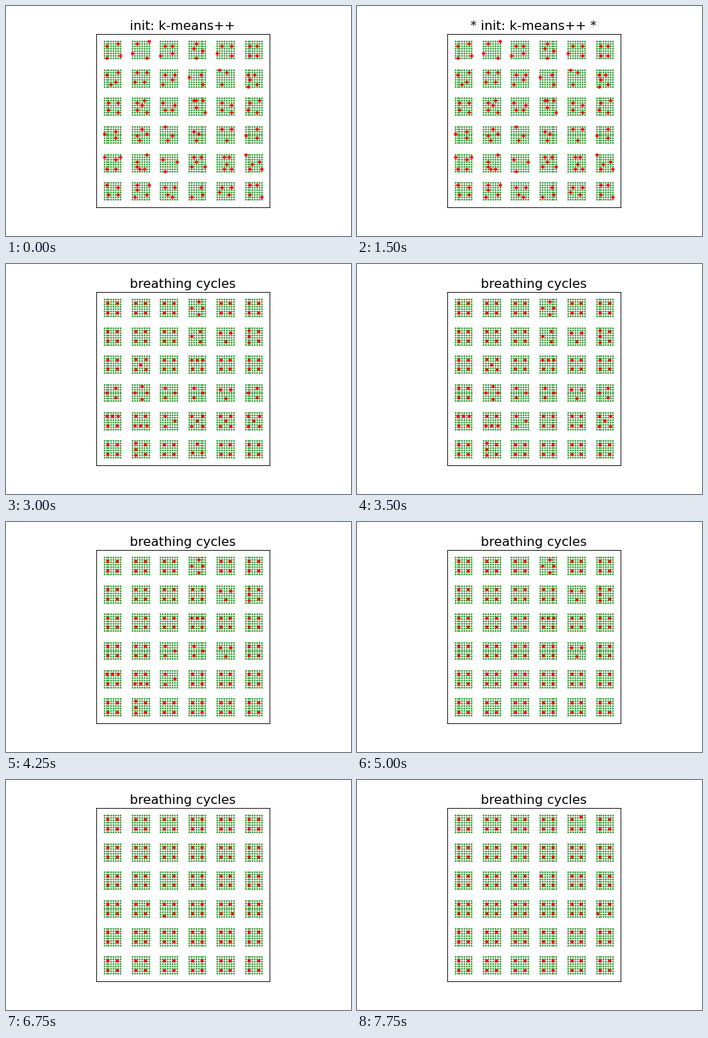
Recreate the animation shown at these times as a matplotlib script. Size 432x288 px, loop 8000 ms.

```python
import numpy as np
import matplotlib.pyplot as plt
from matplotlib.animation import FuncAnimation

SIDE = 8         # data points along one patch edge
PITCH = 12       # distance between neighbouring patches
PATCHES = 6
STEP_MS = 250
INIT_FRAMES = 12
FRAMES = 32
JIGGLE_FROM = 11

W, S, E, N = range(4)   # quarter turns of a layout

# Columns of centres in a patch, from its leading side on.
EVEN, LONE, TRIPLE, MIDDLE, SKEWED = (2, 2), (1, 2), (3, 2), (2, 1, 2), (1, 3)

# Patches repaired in each breathing cycle: (row, column, layout, turn).
REPAIRS = [
    [(3, 0, LONE, W), (4, 4, MIDDLE, W)],
    [(5, 3, LONE, N), (4, 3, MIDDLE, W)],
    [(3, 5, LONE, W), (4, 5, MIDDLE, W)],
    [(1, 3, LONE, W), (2, 1, MIDDLE, W)],
    [(3, 1, SKEWED, W)],
    [(4, 2, LONE, E), (4, 1, TRIPLE, S)],
    [(3, 2, LONE, E), (4, 0, TRIPLE, N)],
    [(3, 3, LONE, E), (5, 1, TRIPLE, W)],
    [(1, 4, LONE, S), (2, 3, TRIPLE, N), (0, 3, SKEWED, W)],
    [(3, 4, LONE, S), (1, 5, TRIPLE, W)],
]

# Positions are complex numbers, y up, measured from the patch centre.
axis = np.arange(SIDE) - (SIDE - 1) / 2
grid = (axis + 1j * axis[:, None]).ravel()


def layout(counts, turn):
    n = len(counts)
    z = [(i + 0.5) / n - 0.5 + 1j * ((j + 0.5) / m - 0.5)
         for i, m in enumerate(counts) for j in range(m)]
    return SIDE * np.array(z) * 1j ** turn


def settle(centres):
    """Lloyd iterations on one patch."""
    for _ in range(20):
        nearest = abs(grid[:, None] - centres).argmin(axis=1)
        centres = np.array([grid[nearest == k].mean()
                            for k in range(len(centres))])
    return centres


def scatter_seeds(centres, rng):
    """Random data points near the given centres."""
    shift = rng.normal(0, 0.7, (2, len(centres)))
    x, y = np.clip(np.floor([centres.real, centres.imag] + shift) + 0.5,
                   axis[0], axis[-1])
    return x + 1j * y


def patch_middle(row, col):
    half = (SIDE - 1) / 2
    return PITCH * (col + 1j * (PATCHES - 1 - row)) + half * (1 + 1j)


home = settle(layout(EVEN, W))
cells = [(r, c) for r in range(PATCHES) for c in range(PATCHES)]
settled = {cell: home for cell in cells}
repaired = {cell: 0 for cell in cells}
for cycle, group in enumerate(REPAIRS, 1):
    for row, col, counts, turn in group:
        settled[row, col] = settle(layout(counts, turn))
        repaired[row, col] = cycle

seed_rng = np.random.default_rng(4)
seeds = {cell: scatter_seeds(settled[cell], seed_rng) for cell in cells}


def jiggle(state, step):
    """Late cycles push single centres outwards for one step."""
    rng = np.random.default_rng(step)
    for _ in range(3):
        cell = rng.integers(0, 4), rng.integers(1, PATCHES)
        pts = state[cell].copy()
        k = rng.integers(len(pts))
        if rng.random() < 0.5:
            pts[k] += np.sign(pts[k].real)
        else:
            pts[k] += 1j * np.sign(pts[k].imag)
        state[cell] = pts


def centres(step):
    if step < 0:
        state = seeds
    else:
        state = {c: settled[c] if step < repaired[c] else home for c in cells}
        if step >= JIGGLE_FROM:
            jiggle(state, step)
    z = np.concatenate([state[c] + patch_middle(*c) for c in cells])
    return z.real, z.imag


def caption(frame):
    if frame >= INIT_FRAMES:
        return "breathing cycles"
    starred = frame // 2 % 2
    return "* init: k-means++ *" if starred else "init: k-means++"


plt.rcParams["font.family"] = "DejaVu Sans"
fig = plt.figure(figsize=(6, 4), dpi=72, facecolor="white")
ax = fig.add_axes([0.125, 0.125, 0.775, 0.755])
ax.set_aspect("equal")
ax.set_xticks([])
ax.set_yticks([])

data = np.concatenate([grid + patch_middle(*c) for c in cells])
ax.plot(data.real, data.imag, "g.", ms=2)
dots, = ax.plot([], [], "r.", ms=6)
extent = PITCH * (PATCHES - 1) + SIDE - 1
margin = 0.05 * extent
ax.set_xlim(-margin, extent + margin)
ax.set_ylim(-margin, extent + margin)
title = ax.set_title("", fontsize=16, pad=5)


def draw(frame):
    dots.set_data(*centres(max(frame - INIT_FRAMES, -1)))
    title.set_text(caption(frame))
    return dots, title


anim = FuncAnimation(fig, draw, frames=FRAMES, interval=STEP_MS,
                     repeat=True, repeat_delay=0)
plt.show()
```
